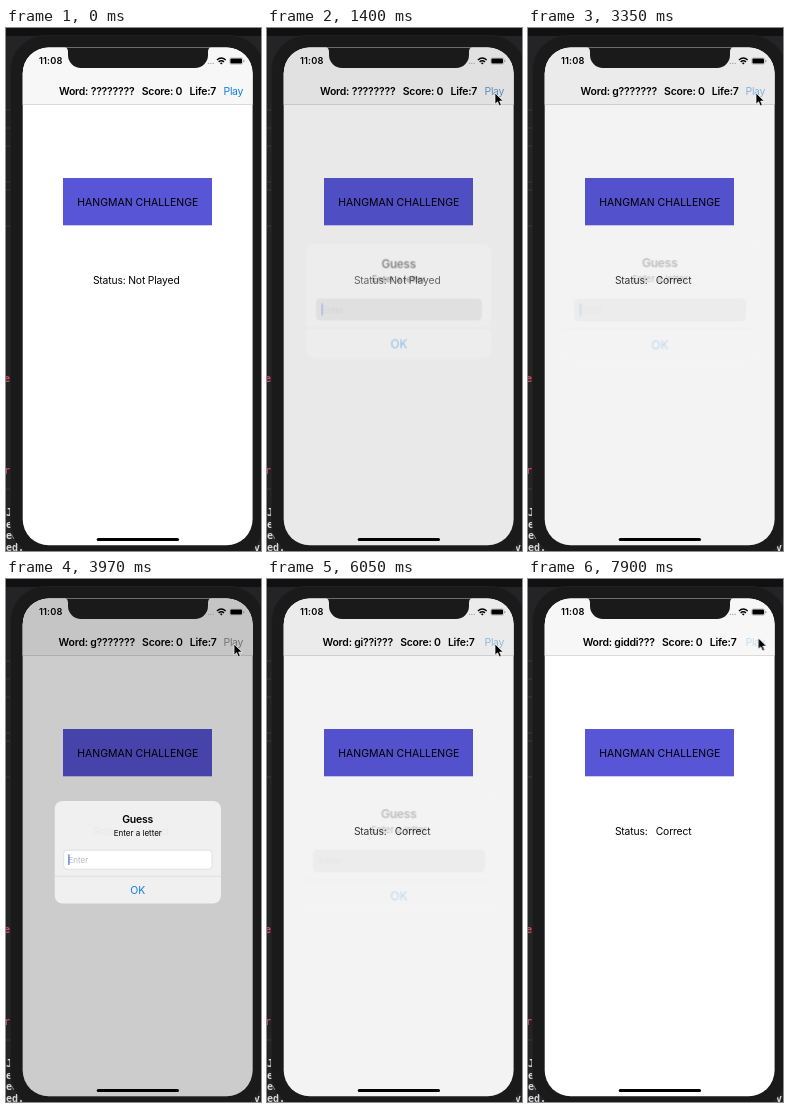
An HTML page for the animation above (8 s loop, 255x523 px).

```html
<!DOCTYPE html>
<html lang="en">
<head>
<meta charset="utf-8">
<title>Hangman</title>
<style>
  /* Registered so that scale and position redraw crisply at every step */
  @property --s { syntax: "<number>"; inherits: false; initial-value: 1; }
  @property --x { syntax: "<length>"; inherits: false; initial-value: 0px; }
  @property --y { syntax: "<length>"; inherits: false; initial-value: 0px; }

  html, body { margin: 0; width: 100%; height: 100%; overflow: hidden; background: #242426; }
  svg { display: block; width: 255px; height: 523px; font-family: Inter, Roboto, sans-serif; }
  text { white-space: pre; }
  .mid { text-anchor: middle; }
  .title { font-size: 10.47px; font-weight: 600; letter-spacing: -.22px; }
  .label { font-size: 10.3px; letter-spacing: -.15px; }
  .small { font-size: 8px; }
  .mono { font: 700 10px "DejaVu Sans Mono", "Liberation Mono", monospace; }

  /* Smooth parts */
  .fade, .alert, .play, .caret, .cursor { animation: 8s ease-out infinite; }
  .fade { animation-name: fade; }
  .alert { animation-name: fade, pop; transform: scale(var(--s)); transform-origin: 131.8px 273.3px; }
  .play { animation-name: tint, press; font-size: 10.47px; letter-spacing: -.3px; }
  .caret { animation-name: blink; animation-timing-function: linear; transform: translateX(var(--x)); }
  .cursor { animation-name: move; animation-timing-function: ease-in-out; transform: translate(var(--x), var(--y)); }

  /* Hard changes */
  .cut { animation: 8s step-end infinite; }
  .w0 { animation-name: w0; }
  .w1 { animation-name: w1; }
  .w2 { animation-name: w2; }
  .w3 { animation-name: w3; }
  .solved { animation-name: solved; }
  .field { animation-name: field; }
  .hint { animation-name: hint; }
  .k1 { animation-name: k1; }
  .k2 { animation-name: k2; }
  .k3 { animation-name: k3; }

  @keyframes fade {
    0%, 16.25%, 30.625%, 41.25%, 66.875%, 75%, 88.125%, 100% { opacity: 0; }
    20.625%, 26.25%, 45.625%, 62.5%, 79.375%, 83.75% { opacity: 1; }
  }
  @keyframes pop {
    0%, 16.25%, 41.25%, 75%, 100% { --s: 1.2; }
    20.625%, 30.625%, 45.625%, 66.875%, 79.375%, 88.125% { --s: 1; }
  }
  @keyframes tint {
    0%, 16.25%, 30.625%, 41.25%, 66.875%, 75%, 88.125%, 100% { fill: #107ee4; }
    20.625%, 26.25%, 45.625%, 62.5%, 79.375%, 83.75% { fill: #8f8f92; }
  }
  @keyframes press {
    0%, 12%, 19.375%, 39.3%, 43.75%, 71.8%, 78.125%, 98.7% { opacity: 1; }
    13.125%, 15%, 39.375%, 41.25%, 71.875%, 75%, 98.75%, 100% { opacity: .2; }
  }
  @keyframes blink {
    0%, 24.375%, 41.25%, 49.7%, 76.5%, 80% { opacity: 1; --x: 0px; }
    25%, 41.2%, 51.25%, 54.3%, 76%, 80.7%, 100% { opacity: 0; --x: 0px; }
    54.375% { opacity: 1; --x: 2.5px; }
    56.25% { opacity: 0; --x: 2.5px; }
  }
  @keyframes move {
    0%, 5.6% { opacity: 0; --x: 230px; --y: 2px; }
    5.625% { opacity: 1; --x: 230px; --y: 2px; }
    7% { --x: 206px; --y: 42px; }
    8.2% { --x: 214px; --y: 78px; }
    10%, 12% { --x: 228px; --y: 68px; }
    13.125%, 90% { --x: 228px; --y: 65px; }
    93.125%, 94.5% { --x: 236px; --y: 57px; }
    96.875%, 100% { opacity: 1; --x: 230.3px; --y: 59px; }
  }
  @keyframes w0 { 0% { opacity: 1; } 31.875%, 100% { opacity: 0; } }
  @keyframes w1 { 0%, 68.75%, 100% { opacity: 0; } 31.875% { opacity: 1; } }
  @keyframes w2 { 0%, 88.75%, 100% { opacity: 0; } 68.75% { opacity: 1; } }
  @keyframes w3 { 0% { opacity: 0; } 88.75%, 100% { opacity: 1; } }
  @keyframes solved { 0% { opacity: 0; } 31.875%, 100% { opacity: 1; } }
  @keyframes field {
    0%, 31%, 67%, 89%, 100% { fill: #d2d2d2; stroke: #d2d2d2; }
    20.625%, 45.625%, 79.375% { fill: #fff; stroke: #d2d2d4; }
    26.25%, 62.5%, 83.75% { fill: #ebebeb; stroke: #d2d2d4; }
  }
  @keyframes hint {
    0%, 41.25%, 75% { opacity: 1; }
    24.375%, 54.375%, 82.5%, 100% { opacity: 0; }
  }
  @keyframes k1 { 0%, 31%, 100% { opacity: 0; } 24.375% { opacity: 1; } }
  @keyframes k2 { 0%, 67%, 100% { opacity: 0; } 54.375% { opacity: 1; } }
  @keyframes k3 { 0%, 89%, 100% { opacity: 0; } 82.5% { opacity: 1; } }
</style>
</head>
<body>
<svg viewBox="0 0 255 523">
  <defs>
    <clipPath id="screen"><rect x="16.7" y="19.4" width="229.9" height="497.9" rx="26"/></clipPath>
  </defs>

  <!-- Desktop behind the phone -->
  <rect width="255" height="523" fill="#242426"/>
  <rect width="255" height="8" fill="#111"/>
  <path d="M0 82h6M0 100h6M0 118h6M0 154h6M0 162h6M0 198h6M0 461h6" stroke="#3b3b3d"/>
  <g class="mono">
    <g fill="#c9506a"><text x="-2" y="354">e</text><text x="-2" y="446">r</text></g>
    <g fill="#d8d8d8">
      <text x="0" y="488">J</text><text x="0" y="500">e</text>
      <text x="0" y="511">ee</text><text x="0" y="523">ed.</text>
      <text x="248" y="523">v</text>
    </g>
  </g>
  <rect x="4.5" y="7.5" width="254" height="522" rx="35" fill="#1a1a1a" stroke="#202020"/>

  <g clip-path="url(#screen)">
    <rect x="16" y="19" width="232" height="499" fill="#fff"/>
    <rect x="16" y="19" width="232" height="57.5" fill="#f7f7f7"/>
    <path d="M16 76.5h232" stroke="#c4c4c4" stroke-width=".6"/>

    <g class="title mid">
      <text class="cut w0" x="131.6" y="66.7">Word: ????????   Score: 0   Life:7</text>
      <text class="cut w1" x="131.6" y="66.7">Word: g???????   Score: 0   Life:7</text>
      <text class="cut w2" x="131.6" y="66.7">Word: gi??i???   Score: 0   Life:7</text>
      <text class="cut w3" x="131.6" y="66.7">Word: giddi???   Score: 0   Life:7</text>
    </g>
    <text class="play" x="217.5" y="66.7">Play</text>

    <rect x="57" y="150" width="149" height="47.3" fill="#5856d6"/>
    <text class="mid" x="131.8" y="177.8" font-size="10.47">HANGMAN CHALLENGE</text>
    <g class="label">
      <text class="cut w0" x="86.9" y="255.7">Status: Not Played</text>
      <text class="cut solved" x="86.9" y="255.7">Status:   Correct</text>
    </g>

    <g class="fade"><rect x="16" y="19" width="232" height="499" fill-opacity=".2"/></g>

    <g class="alert">
      <rect x="48.7" y="222" width="166.3" height="102.5" rx="8" fill="#f1f1f1" fill-opacity=".97"/>
      <text class="title mid" x="131.6" y="244">Guess</text>
      <text class="small mid" x="131.8" y="256.5">Enter a letter</text>
      <rect class="cut field" x="57.7" y="271.2" width="148.3" height="19" rx="3.5" stroke-width=".6"/>
      <g class="small">
        <text class="cut hint" x="62.5" y="283.7" fill="#b8b8bc">Enter</text>
        <text class="cut k1" x="62.3" y="283.7">g</text>
        <text class="cut k2" x="62.3" y="283.7">i</text>
        <text class="cut k3" x="62.3" y="283.7">d</text>
      </g>
      <rect class="caret" x="62.3" y="275.3" width="1.2" height="10.6" fill="#4a78dc"/>
      <path d="M48.7 297.3h166.3" stroke="#d4d4d6" stroke-width=".6"/>
      <text class="mid" x="131.8" y="315.1" font-size="10.47" fill="#107ee4">OK</text>
    </g>

    <!-- Status bar, notch and home indicator -->
    <text x="33" y="36.3" font-size="9.24" font-weight="600" letter-spacing=".15">11:08</text>
    <path d="M57 18.5q5 .5 5 5.5v3a13 13 0 0 0 13 13H189a13 13 0 0 0 13-13v-3q0-5 5-5.5z" fill="#1a1a1a"/>
    <g fill="#999">
      <circle cx="202.4" cy="35.4" r=".6"/><circle cx="204.8" cy="35.4" r=".6"/><circle cx="207.2" cy="35.4" r=".6"/>
    </g>
    <path d="M210.9 32q4.4-3.8 8.8 0M212.6 33.9q2.7-2.2 5.4 0" fill="none" stroke="#000" stroke-width="1.4"/>
    <path d="M213.9 35q1.4-1 2.8 0l-1.4 1.5z"/>
    <rect x="223.6" y="29.9" width="13.2" height="6.4" rx="1.7" fill="none" stroke="#aaa" stroke-width=".6"/>
    <rect x="224.4" y="30.6" width="11.6" height="5" rx="1"/>
    <rect x="237.4" y="32" width=".9" height="2.2" rx=".4" fill="#888"/>
    <rect x="90.7" y="510" width="82.3" height="3" rx="1.5"/>
  </g>

  <path class="cursor" d="M0 0V11.2l2.6-2.4 1.7 4 2-.9-1.7-3.8H8.2Z" stroke="#fff" stroke-width=".7"/>
</svg>
</body>
</html>
```
